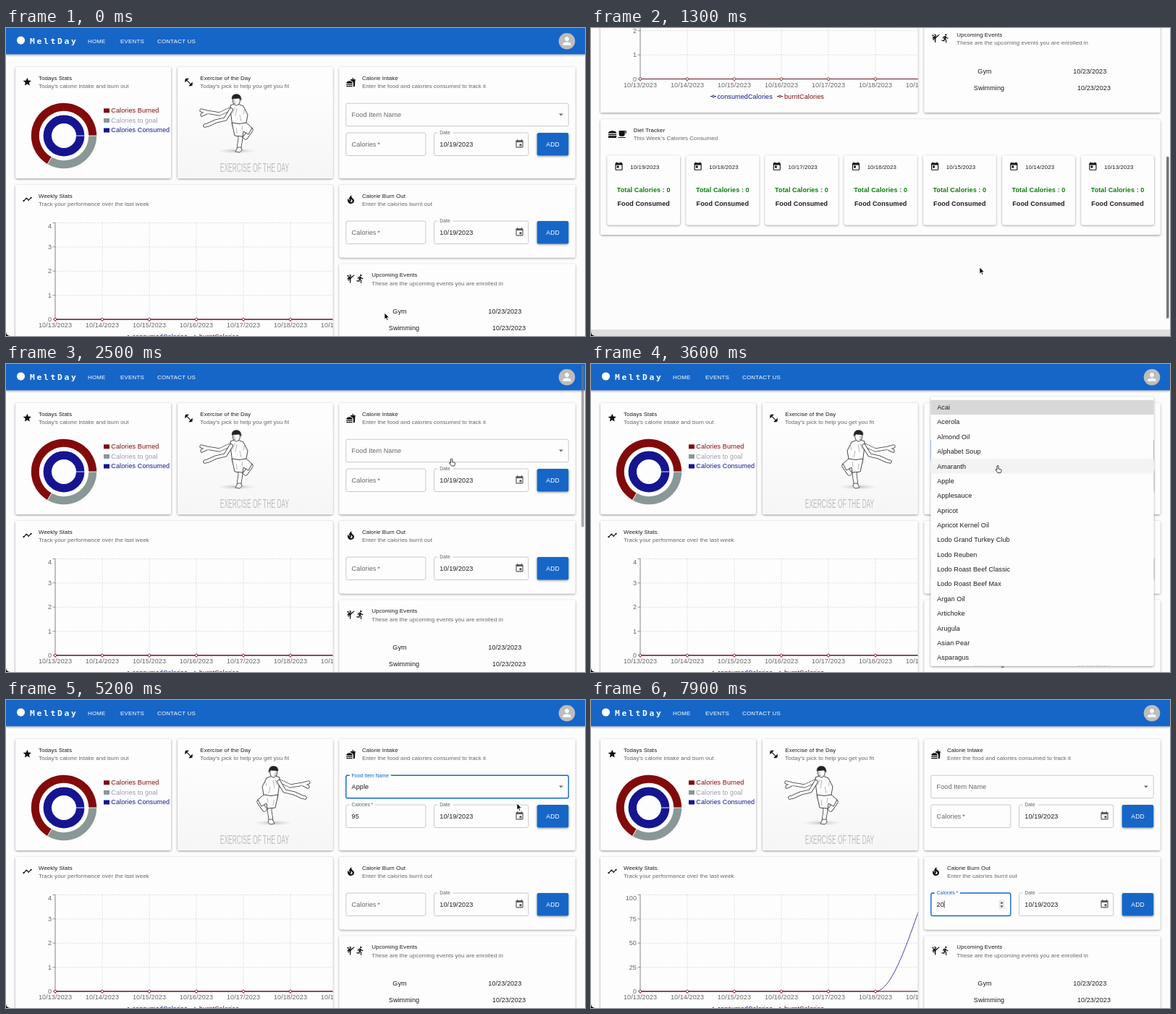
These frames come from a looping animation (800 by 426 pixels, 8 s). An HTML page:

```html
<!DOCTYPE html>
<html lang="en">
<head>
<meta charset="utf-8">
<title>Fitness dashboard</title>
<style>
html, body { margin: 0; width: 100%; height: 100%; overflow: hidden; background: #fcfcfc; }
svg { display: block; width: 800px; height: 426px; font-family: "Liberation Sans", Arial, sans-serif; }
text { letter-spacing: .0095em; white-space: pre; }
.caps { letter-spacing: .0286em; }
.brand { font: bold 11.3px "DejaVu Sans Mono", monospace; letter-spacing: 2.71px; }
.mid { text-anchor: middle; }
.end { text-anchor: end; }
.bold { font-weight: bold; }
</style>
</head>
<body>
<svg viewBox="0 0 800 426">
  <defs>
    <filter id="shade" x="-10%" y="-10%" width="120%" height="125%">
      <feDropShadow dx="0" dy="1" stdDeviation="1.5" flood-opacity=".42"/>
    </filter>
    <clipPath id="chartClip"><path d="M13 217H451.5V449H13z"/></clipPath>
    <linearGradient id="pictureTone" x2="0" y2="1">
      <stop stop-color="#fdfdfd"/><stop offset="1" stop-color="#f6f6f6"/>
    </linearGradient>
    <radialGradient id="groundTone"><stop stop-color="#bbb"/><stop offset="1" stop-color="#ddd" stop-opacity="0"/></radialGradient>
  </defs>
  <g id="page"><g id="base"></g><g id="figure"></g><g id="chart"></g><g id="forms"></g></g>
  <g id="overlay"></g>
  <path d="M0 420Q0 426 7 426H0z"/>
</svg>
<script>
const LOOP = 8000, BLUE = '#1766c8', INK = '#1c1c1c', GREY = '#666', PAPER = '#fdfdfd';
const RED = '#820a0a', NAVY = '#151591', ASH = '#8a9797';
const BODY = 9.05, SMALL = 7.92, TINY = 6.8;
const $ = id => document.getElementById(id);

const ICONS = {
  star: 'M12 17.27 18.18 21l-1.64-7.03L22 9.24l-7.19-.61L12 2 9.19 8.63 2 9.24l5.46 4.73L5.82 21z',
  weights: 'M20.57 14.86 22 13.43 20.57 12 17 15.57 8.43 7 12 3.43 10.57 2 9.14 3.43 7.71 2 5.57 4.14 4.14 2.71 2.71 4.14l1.43 1.43L2 7.71l1.43 1.43L2 10.57 3.43 12 7 8.43 15.57 17 12 20.57 13.43 22l1.43-1.43L16.29 22l2.14-2.14 1.43 1.43 1.43-1.43-1.43-1.43L22 16.29z',
  food: 'M18 23h1.7q1.5 0 1.7-1.5L23 5h-5V1h-2v4h-5l.3 2.4q6.7 2 6.7 7.6zM1 22v-1h15v1q0 1-1 1H2q-1 0-1-1zm15-7c0-8-15-8-15 0zM1 17h15v2H1z',
  flame: 'M19.48 12.35c-1.57-4.08-7.16-4.3-5.81-10.23.1-.44-.37-.78-.75-.55C9.29 3.71 6.68 8 8.87 13.62c.18.46-.36.89-.75.59-1.81-1.37-2-3.34-1.84-4.75.06-.52-.62-.77-.91-.34C4.69 10.16 4 11.84 4 14.37c.38 5.6 5.11 7.32 6.81 7.54 2.43.31 5.06-.14 6.95-1.87 2.08-1.93 2.84-5.01 1.72-7.69zm-9.28 5.03c1.44-.35 2.18-1.39 2.38-2.31.33-1.43-.96-2.83-.09-5.09.33 1.87 3.27 3.04 3.27 5.08.08 2.53-2.66 4.7-5.56 2.32z',
  trend: 'M1 16a2 2 0 0 1 2.5-2L8 9.500a2 2 0 1 1 4 0l2.500 2.500h1L19 8.500a2 2 0 1 1 1.500 1.500L17 13.500a2 2 0 1 1-4 0L10.500 11h-1L5 15.500A2 2 0 1 1 1 16z',
  kick: 'M3 5a2 2 0 1 1 4 0 2 2 0 1 1-4 0M19.800 2 11.600 8.700 10.400 7.660 14 5.580 9.410 1 8 2.410 10.740 5.150 5 8.460 3.810 12.750 6.270 17 8 16 6.280 13 6.710 11.500 9 14l.5 8h2L12 12l9-8.600z',
  run: 'M13.490 5.480c1.100 0 2-.9 2-2s-.9-2-2-2-2 .9-2 2 .9 2 2 2zm-3.600 13.900 1-4.400 2.100 2v6h2v-7.500l-2.100-2 .6-3c1.300 1.500 3.300 2.500 5.500 2.500v-2c-1.900 0-3.500-1-4.300-2.400l-1-1.600c-.4-.6-1-1-1.700-1-.3 0-.5.1-.8.1l-5.200 2.200v4.700h2v-3.400l1.800-.7-1.600 8.100-4.900-1-.4 2 7 1.400z',
  burger: 'M2 16h20v3q0 2-2 2H4q-2 0-2-2zM2 11.500h20v2.500H2zM22 9.500C22 5 17 3.500 12 3.500S2 5 2 9.500z',
  cup: 'M20 3H4v10c0 2.210 1.790 4 4 4h6c2.210 0 4-1.790 4-4v-3h2c1.110 0 2-.89 2-2V5c0-1.110-.89-2-2-2zm0 5h-2V5h2v3zM2 21h18v-2H2v2z',
  today: 'M19 3h-1V1h-2v2H8V1H6v2H5q-2 0-2 2v14q0 2 2 2h14q2 0 2-2V5q0-2-2-2zm0 16H5V8h14zM7 10h5v5H7z',
  picker: 'M17 12h-5v5h5zM16 1v2H8V1H6v2H5q-2 0-2 2v14q0 2 2 2h14q2 0 2-2V5q0-2-2-2h-1V1zm3 18H5V8h14z',
  person: 'M12 12c2.210 0 4-1.790 4-4s-1.790-4-4-4-4 1.790-4 4 1.790 4 4 4zm0 2c-2.670 0-8 1.340-8 4v2h16v-2c0-2.660-5.330-4-8-4z'
};
const FOODS = ['Acai', 'Acerola', 'Almond Oil', 'Alphabet Soup', 'Amaranth', 'Apple', 'Applesauce', 'Apricot',
  'Apricot Kernel Oil', 'Lodo Grand Turkey Club', 'Lodo Reuben', 'Lodo Roast Beef Classic', 'Lodo Roast Beef Max',
  'Argan Oil', 'Artichoke', 'Arugula', 'Asian Pear', 'Asparagus'];

const text = (x, y, str, size = BODY, fill = INK, cls = '') =>
  `<text x="${x}" y="${y}" font-size="${size}" fill="${fill}" class="${cls}">${str}</text>`;
const rect = (x, y, x2, y2, fill, extra = '') =>
  `<rect x="${x}" y="${y}" width="${x2 - x}" height="${y2 - y}" fill="${fill}" ${extra}/>`;
const path = (d, stroke, width = 1, fill = 'none', extra = '') =>
  `<path d="${d}" stroke="${stroke}" stroke-width="${width}" fill="${fill}" ${extra}/>`;
const icon = (name, cx, cy, fill = '#111', size = 13.57) =>
  `<path d="${ICONS[name]}" fill="${fill}" fill-rule="evenodd" transform="translate(${cx - size / 2} ${cy - size / 2}) scale(${size / 24})"/>`;
const card = (x, y, x2, y2) => rect(x, y, x2, y2, PAPER, 'rx="2.3" filter="url(#shade)"');
const heading = (x, y, title, sub) => text(x, y, title, SMALL) + text(x, y + 11.3, sub, SMALL, GREY);
const times = (n, fn) => Array.from({ length: n }, (_, i) => fn(i)).join('');

const smooth = u => { u = Math.min(1, Math.max(0, u)); return u * u * (3 - 2 * u); };
// Eased value at time t from [time, value...] keys.
function track(keys, t, col = 1) {
  const i = keys.findIndex(k => k[0] > t);
  if (i < 0) return keys.at(-1)[col];
  if (!i) return keys[0][col];
  const a = keys[i - 1], b = keys[i];
  return a[col] + (b[col] - a[col]) * smooth((t - a[0]) / (b[0] - a[0]));
}

function ring(r, width, color, from, to) {
  const point = a => `${80 + r * Math.cos(a * Math.PI / 180)} ${149 + r * Math.sin(a * Math.PI / 180)}`;
  return path(`M${point(from)}A${r} ${r} 0 ${to - from > 180 ? 1 : 0} 1 ${point(to)}`, color, width);
}

function drawBase() {
  const legend = [['Calories Burned', RED, RED], ['Calories to goal', ASH, '#9a9fa0'], ['Calories Consumed', NAVY, NAVY]];
  const marker = (x, y, color) => path(`M${x} ${y}h8`, color) + `<circle cx="${x + 4}" cy="${y}" r="1.4" fill="${PAPER}" stroke="${color}"/>`;
  return rect(0, -40, 800, 0, '#fff') + rect(0, 749.5, 800, 850, '#dedede')
    + rect(0, 0, 800, 36.300, BLUE, 'filter="url(#shade)"')
    + '<circle cx="20.500" cy="17" r="5.500" fill="#fff"/>' + `<text x="33" y="22" fill="#fff" class="brand">MeltDay</text>`
    + [[113, 'HOME'], [158, 'EVENTS'], [209, 'CONTACT US']].map(([x, s]) => text(x, 21, s, SMALL, '#fff', 'caps')).join('')
    + '<circle cx="775" cy="18.200" r="11.300" fill="#bdbdbd"/>' + icon('person', 775, 18, '#fff', 17)
    + card(13, 54, 228, 208) + icon('star', 29.300, 74.500) + heading(45, 71.900, 'Todays Stats', "Today's calorie intake and burn out")
    + ring(39.700, 11, RED, 120, 360) + ring(39.700, 11, ASH, 0, 120) + ring(22.700, 11.400, NAVY, 0, 180) + ring(22.700, 11.400, NAVY, 180, 360)
    + path('M97 149h11.800M114 149h11.800M63.100 178.300L57.200 188.500', '#fff', .9)
    + legend.map(([s, fill, ink], i) => rect(135, 111.300 + i * 13.600, 143, 117.300 + i * 13.600, fill) + text(145.300, 116.900 + i * 13.600, s, BODY, ink)).join('')
    + card(237, 54, 451.500, 208) + icon('weights', 252.500, 75) + heading(268.300, 71.900, 'Exercise of the Day', "Today's pick to help you get you fit")
    + rect(237, 86, 451.500, 207, 'url(#pictureTone)')
    + `<g transform="translate(343.500 199) scale(.53 1)">${text(0, 0, 'EXERCISE OF THE DAY', 15.800, '#bcbcbc', 'mid')}</g>`
    + card(460.500, 54, 786.500, 208) + icon('food', 476.500, 75) + heading(492, 71.900, 'Calorie Intake', 'Enter the food and calories consumed to track it')
    + card(13, 217, 451.500, 449.500) + icon('trend', 29.500, 237) + heading(45, 234.500, 'Weekly Stats', 'Track your performance over the last week')
    + marker(165, 427, NAVY) + text(174.500, 430, 'consumedCalories', BODY, NAVY) + marker(257, 427, RED) + text(267, 430, 'burntCalories', BODY, RED)
    + card(460.500, 217, 786.500, 317.500) + icon('flame', 476.500, 237.300) + heading(492, 234.500, 'Calorie Burn Out', 'Enter the calories burnt out')
    + card(460.500, 326.500, 786.500, 449.500) + icon('kick', 476.500, 346.800) + icon('run', 489.500, 346.800)
    + heading(505.300, 344.200, 'Upcoming Events', 'These are the upcoming events you are enrolled in')
    + text(544, 395.300, 'Gym', BODY, INK, 'mid') + text(689.300, 395.300, '10/23/2023', BODY, INK, 'mid')
    + text(550, 418, 'Swimming', BODY, INK, 'mid') + text(695, 418, '10/23/2023', BODY, INK, 'mid')
    + card(13, 458.800, 786.500, 618.500) + icon('burger', 29.500, 479.500) + icon('cup', 43.200, 479.500)
    + heading(58.700, 476.600, 'Diet Tracker', "This Week's Calories Consumed")
    + times(7, i => {
      const x = 22.500 + 109.150 * i;
      return card(x, 508.800, x + 100.500, 604.800) + icon('today', x + 16, 524.200) + text(x + 31.700, 527.300, `10/${19 - i}/2023`, SMALL)
        + text(x + 50.200, 559.500, 'Total Calories : 0', BODY, '#0b7f0b', 'mid bold') + text(x + 50.200, 578.500, 'Food Consumed', BODY, INK, 'mid bold');
    });
}

function drawFigure(t) {
  const p = t % 2000;
  const u = smooth((p - 950) / 200) - smooth((p - 1650) / 200);
  const flipped = u >= .5;
  const limb = (d, w) => path(d, '#333', w + 1.500, 'none', 'stroke-linejoin="round" stroke-linecap="round"')
    + path(d, '#fcfcfc', w, 'none', 'stroke-linejoin="round" stroke-linecap="round"');
  const hop = -9 * Math.sin(Math.PI * u);
  const body = limb('M312 111L295 119 277 116M277 116l-7-2M277 117l-6 3', 3.600)
    + limb('M327 138L338 141 331 151', 5.500) + limb('M321 140L324 152 322 166', 5)
    + path('M320 165h5l1 4-3 3-6-1z', '#333', .8, '#fcfcfc')
    + path('M310 107Q318 103 328 108L334 120 331 136 313 136 311 122z', '#333', .9, '#fcfcfc')
    + path('M312 131Q322 134 332 131L340 138 335 147 328 143 327 150 316 149z', '#333', .9, '#fcfcfc')
    + path('M316 110l-3 8M319 111l-2 11M323 120l2 9M318 138l1 8M327 135l-1 7M330 112l-2 7', '#888', .6)
    + limb('M311 113L303 126 290 129 279 134M279 134l-4 1', 3.800)
    + '<ellipse cx="318.300" cy="100.500" rx="5" ry="6.500" fill="#fcfcfc" stroke="#333" stroke-width=".9"/>'
    + path('M312 98Q312 91.500 318.500 91.500T325 100L322.500 97z', '#222', .6, '#222')
    + path('M314.500 101h2M315 104h2.500', '#333', .7);
  return `<g transform="${flipped ? 'matrix(-1 0 0 1 688 0)' : ''} translate(${48 * (flipped ? 1 - u : u)} 0)">`
    + `<ellipse cx="319" cy="170" rx="27" ry="4" fill="url(#groundTone)"/><g transform="translate(0 ${hop})">${body}</g></g>`;
}

function drawChart(t) {
  const added = t >= 6100, rise = 127 * smooth((t - 6100) / 1200), base = 403;
  const dashes = 'stroke-dasharray="1.700 1.700"';
  const end = base - rise, curve = `M68 ${base}H393C414.700 ${base} 436.300 ${end + rise / 2} 458 ${end}`;
  return '<g clip-path="url(#chartClip)">'
    + times(4, i => path(`M68 ${269.500 + i * 33.400}H458`, '#ccc', .7, 'none', dashes))
    + times(5, i => path(`M${133 + i * 65} 269.500V403`, '#ccc', .7, 'none', dashes))
    + path('M68 269.500V403H458', GREY, .8)
    + times(5, i => path(`M64.500 ${base - i * 33.400}H68`, GREY, .7)
      + text(63, i < 4 ? 406.200 - i * 33.400 : 276.500, added ? i * 25 : i, BODY, GREY, 'end'))
    + times(7, i => path(`M${68 + i * 65} 403v3.500`, GREY, .7) + text(68 + i * 65, 414, `10/${13 + i}/2023`, BODY, GREY, 'mid'))
    + path(curve, NAVY, .8) + path('M68 403H458', RED, .8)
    + times(6, i => `<circle cx="${68 + i * 65}" cy="403" r="1.800" fill="#fff" stroke="${RED}" stroke-width=".8"/>`)
    + '</g>';
}

function field(x, y, x2, label, value, focused, labelWidth) {
  const raised = focused || value, line = focused ? BLUE : '#bdbdbd';
  return rect(x, y, x2, y + 31.500, 'none', `rx="2.300" stroke="${line}" stroke-width="${focused ? 1.400 : .8}"`)
    + (raised ? rect(x + 5, y - 1, x + 10 + labelWidth, y + 1, PAPER) + text(x + 7.800, y + 2.300, label, TINY, focused ? BLUE : GREY)
      : text(x + 7.800, y + 19, label, BODY, GREY))
    + text(x + 7.800, y + 19, value);
}

function drawForms(t) {
  const picked = t >= 4100 && t < 5950, typed = t < 7600 ? '' : t < 7700 ? '2' : '20', burning = t >= 6900;
  const row = (y, value, focused) => field(469.800, y, 579.800, 'Calories\u2009*', value, focused, 30)
    + field(591.500, y, 721.800, 'Date', '10/19/2023', false, 16)
    + icon('picker', 709.500, y + 15.300, '#555')
    + rect(733.700, y, 777.300, y + 31.500, BLUE, 'rx="2.300" filter="url(#shade)"') + text(755.600, y + 18.700, 'ADD', 8.480, '#fff', 'caps mid');
  const caret = 478 + typed.length * 5.100;
  return field(469.800, 104.200, 777.200, 'Food Item Name', picked ? 'Apple' : '', t >= 2900 && t < 5950, 52)
    + '<path d="M764 118.600h5.800l-2.900 2.900z" fill="#666"/>'
    + row(145, picked ? '95' : '', false) + row(267, typed, burning)
    + (burning ? rect(563.500, 276.500, 571.500, 289, '#e9e9e9', 'rx="1.500"') + '<path d="M565.500 281.500l2-2.500 2 2.500zM565.500 284.500l2 2.500 2-2.500z" fill="#444"/>'
      + (t >= 7600 || (t - 6900) % 1000 < 500 ? path(`M${caret} 277.500v10`, '#111', .7) : '') : '');
}

const SCROLL = [[620, 0], [1300, 332.500], [1450, 332.500], [1900, -7], [2300, 0]];
const POINTER = [[0, 523, 394], [500, 537, 331], [1900, 537, 331], [2600, 620, 120], [3000, 620, 120], [3500, 562, 141], [3600, 562, 141],
  [3800, 556, 160], [4300, 556, 160], [5200, 706, 143], [5700, 752, 160], [6050, 752, 160], [6700, 524, 283]];

function drawMenu(t, pointerY) {
  const shown = smooth((t - 2900) / 250) - smooth((t - 4100) / 200);
  if (shown <= 0) return '';
  const s = t < 4000 ? .75 + .25 * shown : 1, step = 20.360, hover = Math.floor((pointerY - 49.800) / step);
  return `<g opacity="${shown}" transform="translate(623 120) scale(${s} ${s * s}) translate(-623 -120)">` + card(469.500, 45.300, 777.500, 417.800)
    + FOODS.map((name, i) => {
      const y = 49.800 + i * step, tone = i ? (i === hover ? '#f3f3f3' : '') : '#d8d8d8';
      return (tone ? rect(469.500, y, 777.500, y + step, tone) : '') + text(478.200, y + 13.300, name);
    }).join('') + '</g>';
}

function drawPointer(t, x, y) {
  if (t > 7500) return '';
  const hand = (t > 2450 && t < 4250) || (t > 5500 && t < 6200), beam = t > 6600;
  const shape = beam ? path('M-1.500-5h3M0-5v10M-1.500 5h3', '#333', .8)
    : hand ? path('M-1 0Q0-1.500 1 0V4L4.500 4.800Q5.500 5.500 5 7L4 9.500H0L-3 5.500-2.500 4.500-1 5.500z', '#111', .8, '#fff')
    : path('M0 0V9L2 7.100 3.400 10.200 4.900 9.500 3.500 6.500H6.300z', '#fff', .7, '#000');
  return `<g transform="translate(${x} ${y})">${shape}</g>`;
}

function drawOverlay(t, scroll) {
  const x = track(POINTER, t), y = track(POINTER, t, 2);
  const bar = smooth((t - 600) / 100) - smooth((t - 2400) / 250), top = Math.max(1.500, 1.500 + scroll * .53);
  return rect(795, top, 798.600, top + 224, '#777', `rx="1.800" opacity="${bar}"`) + drawMenu(t, y) + drawPointer(t, x, y);
}

const last = {};
function put(id, markup) {
  if (last[id] !== markup) $(id).innerHTML = last[id] = markup;
}
put('base', drawBase());

function frame(now) {
  const t = now % LOOP, scroll = track(SCROLL, t);
  $('page').setAttribute('transform', `translate(0 ${-scroll})`);
  put('figure', drawFigure(t));
  put('chart', drawChart(t));
  put('forms', drawForms(t));
  put('overlay', drawOverlay(t, scroll));
  requestAnimationFrame(frame);
}
frame(performance.now());
</script>
</body>
</html>
```
